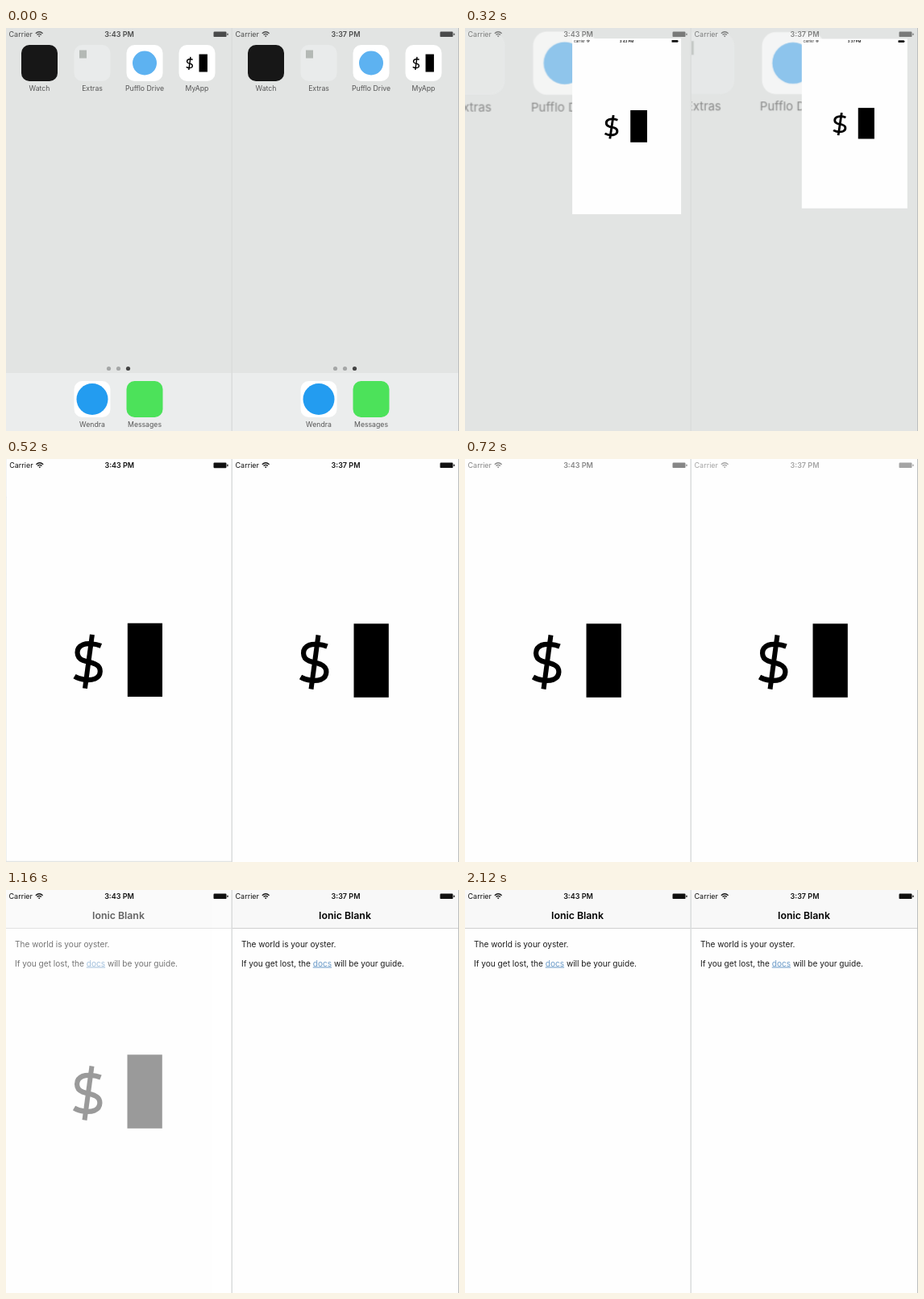
An HTML page that plays this animation: 562 by 500 pixels, repeating every 3000 ms.

```html
<!DOCTYPE html>
<html lang="en">
<head>
<meta charset="utf-8">
<title>App launch comparison</title>
<style>
  html, body { margin: 0; width: 100%; height: 100%; overflow: hidden; background: #fff; }
  svg { display: block; width: 562px; height: 500px; font-family: Inter, "Liberation Sans", sans-serif; }
  .label { font-size: 8.7px; fill: #555; text-anchor: middle; }
  .bar { font-size: 9px; fill: #111; }
  .clock { font-weight: 600; text-anchor: middle; }
  .title { font-size: 12.3px; font-weight: 600; text-anchor: middle; }
  .body { font-size: 10.1px; fill: #1c1c1c; }
  .link { fill: #6b9bc9; text-decoration: underline; }
</style>
</head>
<body>
<svg id="stage" viewBox="0 0 562 500"></svg>
<script>
const LOOP = 3000, STEP = 40;
const ICON = { x: 237, y: 43.5, size: 45 };
const SCREEN = { w: 280, h: 500 };

const phones = [
  { x: 0, clock: "3:43 PM", zoomMid: 336, zoomRate: .0307, statusIn: 560, fadeAt: 873, fadeFor: 500 },
  { x: 281, clock: "3:37 PM", zoomMid: 333.8, zoomRate: .041, statusIn: 600, fadeAt: 720, fadeFor: 400 }
];

const clamp = v => Math.max(0, Math.min(1, v));
const ramp = (t, from, to) => clamp((t - from) / (to - from));
const smooth = u => u * u * (3 - 2 * u);
const mix = (a, b, u) => a + (b - a) * u;

const logo = `
  <path d="M117.500 232.500C110 229.500 100 229 95 231C85.500 235 86 247 95 250.500C101 252.500 105 253 110 255C119 259 118 270 110 273.500C103 276 92 275 84.500 270.500"
    fill="none" stroke="#000" stroke-width="6.200"/>
  <path d="M106.500 218.500L97.500 285.500" stroke="#000" stroke-width="6"/>
  <rect x="150.500" y="204.300" width="43.300" height="91.500"/>`;

function tile(x, y, name, color, mark = "") {
  return `<g transform="translate(${x} ${y})">
    <rect x="-22.500" y="-22.500" width="45" height="45" rx="10" fill="${color}"/>${mark}
    <text class="label" y="34.500">${name}</text></g>`;
}

const dot = (r, color) => `<circle r="${r}" fill="${color}"/>`;

const appTile = tile(ICON.x, ICON.y, "MyApp", "#fff",
  `<g transform="translate(-33.600 -60) scale(.24)">${logo}</g>`);

const home = `
  <rect width="280" height="72" y="428" fill="#ebeded"/>
  ${tile(41.5, 43.5, "Watch", "#171717")}
  ${tile(107, 43.5, "Extras", "#e9ebeb", '<rect x="-16" y="-16" width="9" height="10" fill="#b4b9b5"/>')}
  ${tile(172, 43.5, "Pufflo Drive", "#fff", dot(15, "#5db2f1"))}
  <g data-part="icon">${appTile}</g>
  ${tile(107, 460.5, "Wendra", "#fff", dot(19.5, "#239cf0"))}
  ${tile(172, 460.5, "Messages", "#4ce25a")}
  ${[127.5, 139.5, 151.5].map((x, i) =>
    `<circle cx="${x}" cy="422.500" r="2.600" fill="${i == 2 ? "#444" : "#a5a7a7"}"/>`).join("")}`;

const status = clock => `<g class="bar">
  <text x="3.500" y="11">Carrier</text>
  <g fill="none" stroke="#111" stroke-width="1.300">
    <path d="M36.800 6.700Q41.200 2.700 45.600 6.700M38.500 8.500Q41.200 6.200 43.900 8.500"/>
  </g>
  <path d="M39.800 9.800Q41.200 8.700 42.600 9.800L41.200 11.300Z"/>
  <text class="clock" x="140.500" y="11">${clock}</text>
  <rect x="257.500" y="4.500" width="16" height="6.600" rx="1.200"/>
  <rect x="274.300" y="6.500" width="1.300" height="2.600" rx=".5"/></g>`;

const page = `
  <rect width="280" height="500" fill="#fefefe"/>
  <rect width="280" height="47" fill="#f8f8f8"/>
  <rect width="280" height="1" y="47" fill="#d0d0d0"/>
  <text class="title" x="139.500" y="35.500">Ionic Blank</text>
  <text class="body" x="11" y="70.500">The world is your oyster.</text>
  <text class="body" x="11" y="94.500">If you get lost, the <tspan class="link">docs</tspan> will be your guide.</text>`;

const phoneMarkup = p => `<g transform="translate(${p.x} 0)"><g clip-path="url(#screen)">
  <rect width="280" height="500" fill="#e2e4e3"/>
  <g data-part="home">${home}</g>
  <g data-part="app">${page}
    <g data-part="splash"><rect width="280" height="500" fill="#fefefe"/>${logo}</g>
    <g data-part="appStatus">${status(p.clock)}</g>
  </g>
  <g data-part="status">${status(p.clock)}</g>
</g></g>`;

const stage = document.getElementById("stage");
stage.innerHTML = `
  <defs><clipPath id="screen"><rect width="280" height="500"/></clipPath></defs>
  ${phones.map(phoneMarkup).join("")}
  <rect x="279.500" width="1.500" height="500" fill="#dadcdc"/>
  <rect x="561" width="1" height="500" fill="#bcbebe"/>`;

for (const part of ["home", "icon", "app", "splash", "appStatus", "status"])
  stage.querySelectorAll(`[data-part=${part}]`).forEach((el, i) => phones[i][part] = el);

const fade = (el, opacity) => el.setAttribute("opacity", opacity.toFixed(3));

// The app window grows from its icon while the home screen zooms around that icon.
function zoom(t, p) {
  const u = 1 / (1 + Math.exp(-p.zoomRate * (t - p.zoomMid)));
  return u < .003 ? 0 : u > .997 ? 1 : u;
}

function statusOpacity(t, p) {
  if (t < 320) return mix(.72, .5, t / 320);
  if (t < p.statusIn) return mix(.5, 0, ramp(t, 320, 405));
  return ramp(t, p.statusIn, p.statusIn + 320);
}

function draw(t) {
  for (const p of phones) {
    const u = zoom(t, p);
    const s = 1 + 1.96 * u;
    p.home.setAttribute("transform",
      `translate(${ICON.x} ${ICON.y}) scale(${s}) translate(${-ICON.x} ${-ICON.y})`);
    fade(p.home, 1 - u);
    fade(p.icon, clamp(1 - u * 6));

    const w = mix(ICON.size, SCREEN.w, u), h = mix(ICON.size, SCREEN.h, u);
    const x = mix(ICON.x, SCREEN.w / 2, u) - w / 2, y = mix(ICON.y, SCREEN.h / 2, u) - h / 2;
    p.app.setAttribute("transform",
      `translate(${x} ${y}) scale(${w / SCREEN.w} ${h / SCREEN.h})`);
    fade(p.app, clamp(u * 6));

    fade(p.splash, 1 - smooth(ramp(t, p.fadeAt, p.fadeAt + p.fadeFor)));
    fade(p.appStatus, 1 - ramp(t, 520, 640));
    fade(p.status, statusOpacity(t, p));
  }
}

const start = performance.now();
function tick() {
  const t = (performance.now() - start) % LOOP;
  draw(Math.floor(t / STEP) * STEP);
  requestAnimationFrame(tick);
}
tick();
</script>
</body>
</html>
```
